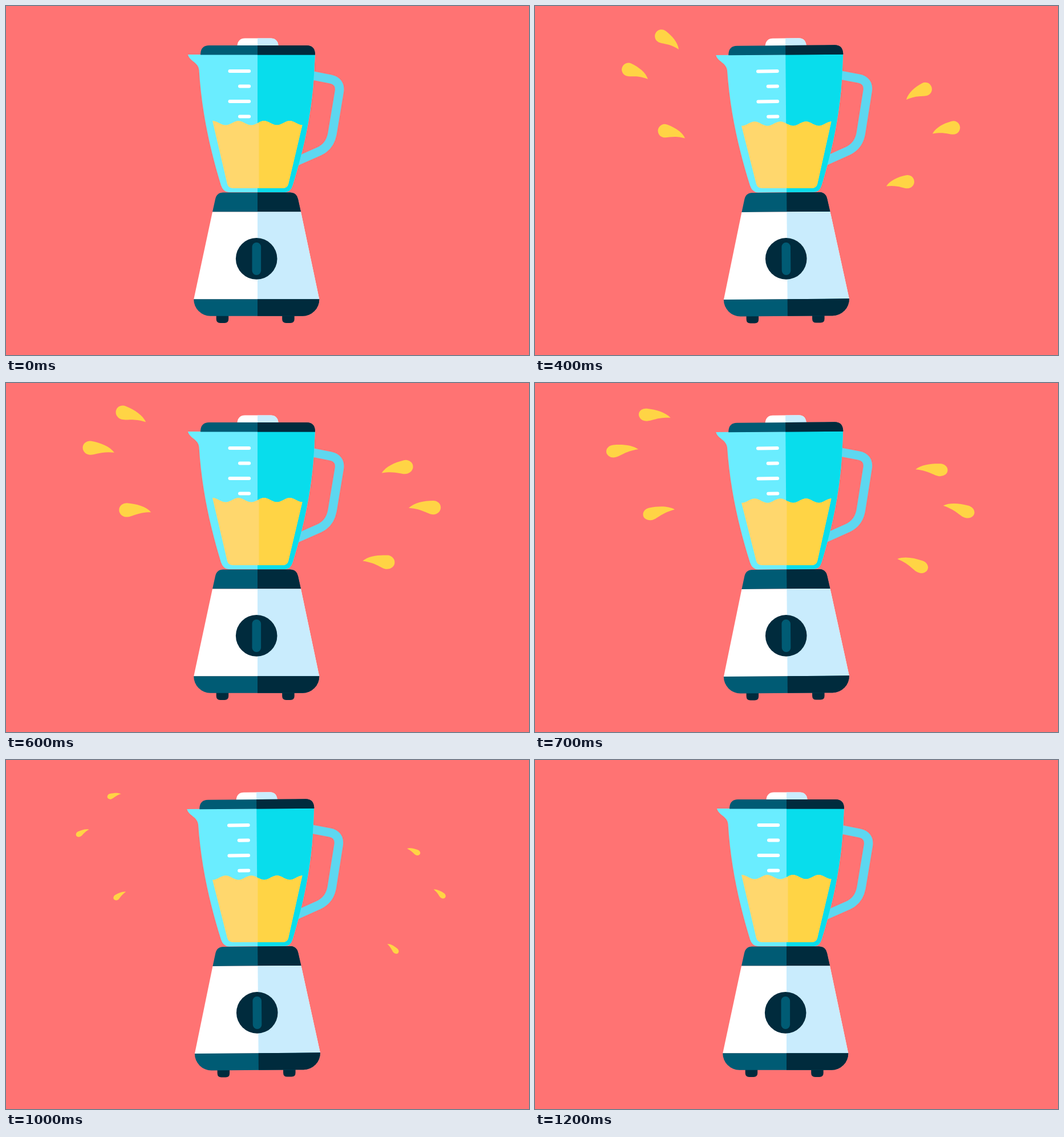
An HTML page for the animation above (1.3 s loop, 917 by 611 pixels).

```html
<!DOCTYPE html>
<html lang="en">
<head>
<meta charset="utf-8">
<title>Blender</title>
<style>
  html, body { margin: 0; width: 100%; height: 100%; overflow: hidden; background: #ff7373; }
  svg { display: block; width: 100%; height: 100%; }
</style>
</head>
<body>
<svg id="stage" viewBox="0 0 917 611">
  <defs>
    <clipPath id="right"><rect x="441" width="476" height="611"/></clipPath>
  </defs>
</svg>
<script>
const STEP = 100, STEPS = 13;
const NAVY = '#002b3d', TEAL = '#005b74', YELLOW = '#ffd445';
const TILTS = [0, -0.45, 1];
const stage = document.getElementById('stage');

function add(parent, tag, attrs) {
  const node = document.createElementNS('http://www.w3.org/2000/svg', tag);
  for (const key in attrs) node.setAttribute(key, attrs[key]);
  return parent.appendChild(node);
}

const blender = add(stage, 'g', {});

// A shape in two tones, divided along the middle of the blender.
function twoTone(d, left, right) {
  add(blender, 'path', { d, fill: left });
  add(blender, 'path', { d, fill: right, 'clip-path': 'url(#right)' });
}

function foot(x) {
  add(blender, 'path', { d: `M${x} 538h21.5v10q0 7-7 7h-7.5q-7 0-7-7z`, fill: NAVY });
}

// Jug
add(blender, 'path', {
  d: 'M536 121.5L569 128C580 130 586 138 584.5 149L572 224C569 240 561 249 549 254.5L506 273.5',
  fill: 'none', stroke: '#5dd7f0', 'stroke-width': 15.5
});
twoTone('M319 85H541.8L540.5 112C537 185 522 252 502.5 314Q499 326 489 326H391Q381 326 377 314' +
  'C358 252 343 185 338.5 112C337 98 322 97 319 85Z', '#6aedff', '#08ddec');
[[389.5, 114], [407, 140.5], [389.5, 167], [407, 193.5]].forEach(([x, y]) =>
  add(blender, 'path', {
    d: `M${x + 3} ${y}H426.2`, stroke: '#fff', 'stroke-width': 6, 'stroke-linecap': 'round'
  }));

// Lid
twoTone('M405.5 70V69Q407 56.5 419 56.5H464Q476 56.5 477.5 69V70Z', '#fff', '#c9ecfd');
twoTone('M341 85.5V83.5Q342 69 356 69H527Q541 69 542 83.5V85.5Z', TEAL, NAVY);

// Base
foot(368.7);
foot(484.2);
twoTone('M362 360.5L367 338Q369.5 326.5 381 326.5H498Q509.5 326.5 512 338L517 360.5Z', TEAL, NAVY);
twoTone('M362 360.5H517L549.3 513.5H329.2Z', '#fff', '#c9ecfd');
twoTone('M329.2 513.2H549.3A29.4 29.4 0 0 1 520 542.8H358.5A29.4 29.4 0 0 1 329.2 513.2Z', TEAL, NAVY);
add(blender, 'circle', { cx: 439.2, cy: 442.4, r: 36.3, fill: NAVY });
add(blender, 'rect', { x: 431.5, y: 414, width: 15.6, height: 57, rx: 7.8, fill: TEAL });

// Juice
const juiceClip = add(add(stage.querySelector('defs'), 'clipPath', { id: 'juice' }), 'path', {});
const juice = add(stage, 'g', { 'clip-path': 'url(#juice)' });
add(juice, 'rect', { x: 355, y: 195, width: 175, height: 130, fill: '#ffd76d' });
const juiceShade = add(juice, 'rect', { y: 195, width: 100, height: 130, fill: YELLOW });

function juicePath(flipped) {
  const sign = flipped ? 1 : -1, middle = flipped ? 206 : 204.8;
  let d = '';
  for (let x = 362; x <= 520.5; x += 1.5) {
    const y = middle + sign * 3.7 * Math.cos((x - 362.5) / 45 * 2 * Math.PI);
    d += `${d ? 'L' : 'M'}${x} ${y.toFixed(2)}`;
  }
  return d + 'L495 312Q493 319 485 319H398Q390 319 388 312Z';
}
const calmJuice = juicePath(false), flippedJuice = juicePath(true);

// Drops: tip position, upward angle, side of the blender
const DROP = 'M0 0C10-10 26-13.2 43-13.2A13.2 13.2 0 0 1 43 13.2C33 13.2 26 2.5 0 0Z';
const drops = [
  [252, 76, 37.5, -1], [198, 128, 26, -1], [263, 231.5, 20, -1],
  [651, 164, 29, 1], [697, 223.5, 16, 1], [616, 315.5, 12, 1]
].map(([x, y, angle, side]) => ({
  x, y, angle, side, node: add(stage, 'path', { d: DROP, fill: YELLOW })
}));

// Flight after the growth: forward, down, turn, size, slimness
const FLIGHT = [
  [10, -2, 15, 1, 0.92], [20.5, -3.3, 30.5, 1, 0.83], [37.7, 6.7, 37.5, 0.73, 0.83],
  [44.5, 12, 44.5, 0.58, 0.83], [50, 17.4, 51, 0.44, 0.83], [55, 23, 58, 0.26, 0.83],
  [55, 23, 58, 0, 0.83]
];

function dropPose(step) {
  if (step > 5) return FLIGHT[step - 6];
  return [0, 0, 0, 0.308 * step - 0.0217 * step * step, 1];
}

function render(ms) {
  const step = Math.floor(ms / STEP) % STEPS;
  const phase = step % 3, flipped = phase === 1;
  blender.setAttribute('transform', `rotate(${TILTS[phase]} 441 305)`);
  juiceClip.setAttribute('d', flipped ? flippedJuice : calmJuice);
  juiceShade.setAttribute('x', flipped ? 441.5 : 443.5);

  const [forward, down, turn, size, slim] = dropPose(step);
  for (const { x, y, angle, side, node } of drops) {
    node.setAttribute('visibility', size > 0 ? 'visible' : 'hidden');
    node.setAttribute('transform', `translate(${x} ${y}) scale(${side} 1) rotate(${-angle}) ` +
      `translate(${forward} ${down}) rotate(${turn}) scale(${size} ${size * slim})`);
  }
}

const start = performance.now();
function tick() {
  render(performance.now() - start);
  requestAnimationFrame(tick);
}
tick();
</script>
</body>
</html>
```
